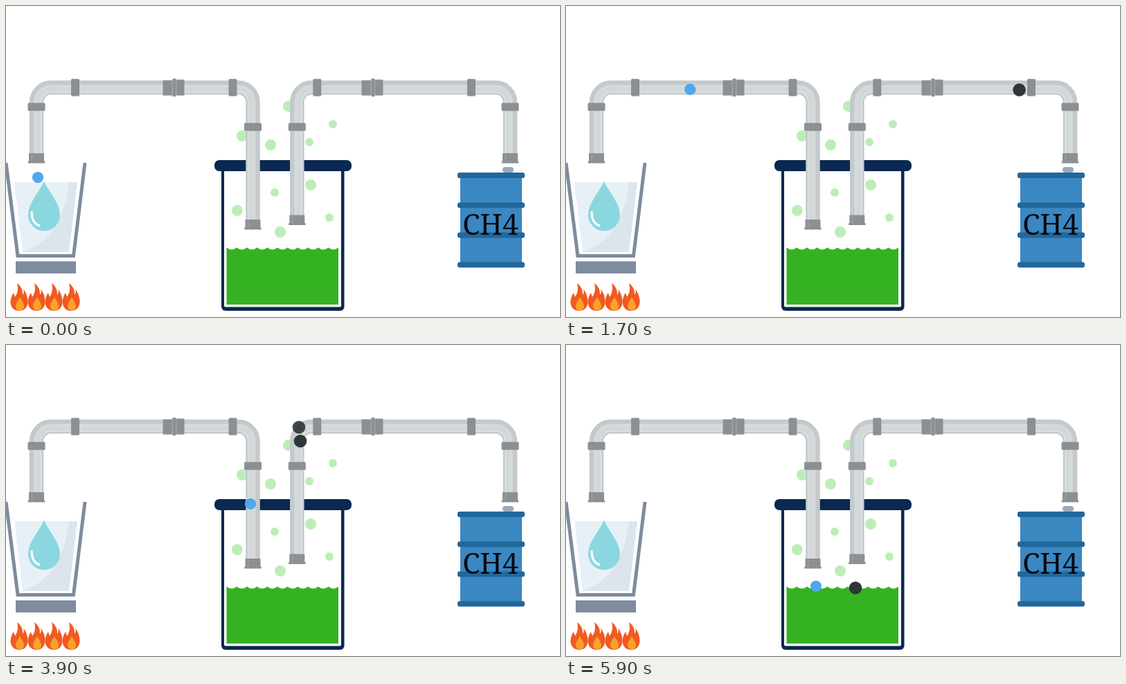
An HTML page with a canvas for the animation above (6 s loop, 800 by 450 pixels).

```html
<!DOCTYPE html>
<html lang="en">
<head>
<meta charset="utf-8">
<title>Gas pipeline</title>
<style>
html, body { margin: 0; width: 100%; height: 100%; overflow: hidden; background: #fff; }
canvas { display: block; }
</style>
</head>
<body>
<canvas id="stage" width="800" height="450"></canvas>
<script>
const ctx = document.getElementById('stage').getContext('2d');
const LOOP = 6000, STEP = 100;
const NAVY = '#0b2850', SLATE = '#7f8b9e', FITTING = '#8c9092', SEAM = '#a8acae';

function rect(x, y, w, h, color, r = 0) {
  ctx.fillStyle = color;
  ctx.beginPath();
  ctx.roundRect(x, y, w, h, r);
  ctx.fill();
}

const centeredRect = (x, y, w, h, color, r) => rect(x - w / 2, y - h / 2, w, h, color, r);

function circle(x, y, r, color) {
  ctx.fillStyle = color;
  ctx.beginPath();
  ctx.arc(x, y, r, 0, Math.PI * 2);
  ctx.fill();
}

function fillPath(color, d) {
  ctx.fillStyle = color;
  ctx.fill(new Path2D(d));
}

function strokePath(color, width, d) {
  ctx.strokeStyle = color;
  ctx.lineWidth = width;
  ctx.stroke(new Path2D(d));
}

// A pointed drop with a round base.
function drop(x, tip, bottom, r, color) {
  const mid = bottom - r;
  ctx.fillStyle = color;
  ctx.beginPath();
  ctx.moveTo(x, tip);
  ctx.bezierCurveTo(x + r * 0.2, tip + r * 0.6, x + r, mid - r * 0.8, x + r, mid);
  ctx.arc(x, mid, r, 0, Math.PI);
  ctx.bezierCurveTo(x - r, mid - r * 0.8, x - r * 0.2, tip + r * 0.6, x, tip);
  ctx.fill();
}

function drawFlame(x) {
  ctx.save();
  ctx.translate(x, 401);
  fillPath('#f15a22', 'M-3 0Q6 7 5 17Q8 13 6 8Q13 18 12.5 28Q11 40 0 40T-12.5 28Q-12 19 -8 14L-6 20Q0 12 -3 0Z');
  ctx.restore();
  drop(x + 1, 421, 440.5, 6, '#f9a32b');
}

function drawCup() {
  fillPath('#e7f0f7', 'M12 255H103L91 356H24Z');
  fillPath('#dce5ec', 'M103 255L91 356H24Q82 336 91 255Z');
  strokePath(SLATE, 5, 'M0 227L17 361.5H97.5L114 227');
  drop(55, 253, 325.5, 23, '#8ad7df');
  strokePath('#f4fcfd', 3.4, 'M37 297Q37 315 49 318');
  rect(14, 369.5, 87, 17.5, SLATE);
  for (let i = 0; i < 4; i++) drawFlame(19 + i * 25);
}

function drawLiquid(left, right, level, bottom) {
  const ripple = 14.7;
  ctx.fillStyle = '#35b222';
  ctx.beginPath();
  ctx.moveTo(left, bottom);
  ctx.lineTo(left, level);
  for (let x = left + ripple; x < right + ripple; x += ripple) {
    ctx.quadraticCurveTo(x - ripple / 2, level + 6, Math.min(x, right), level);
  }
  ctx.lineTo(right, bottom);
  ctx.fill();
}

function drawBubbles() {
  const large = [[408, 145], [341, 188], [382, 201], [440, 259], [334, 296], [396, 327]];
  const small = [[472, 171], [438, 197], [388, 270], [467, 306]];
  large.forEach(([x, y]) => circle(x, y, 8, '#bdedb7'));
  small.forEach(([x, y]) => circle(x, y, 6, '#bdedb7'));
}

function drawTank() {
  rect(311, 230, 177.5, 211, NAVY, 6);
  rect(315, 230, 169, 205.5, '#fff', 2);
  rect(301, 223, 198, 16, NAVY, 7);
  drawBubbles();
  drawLiquid(318.5, 480, 349.5, 432);
}

function drawBarrel() {
  rect(717, 233, 16, 8, '#9ca9b9', 4);
  rect(656, 243, 89, 134, '#3b87c2');
  for (let i = 0; i < 4; i++) rect(652, 241 + i * 43.2, 97, 8, '#22679b', 3);
  ctx.fillStyle = '#080a10';
  ctx.font = '41px "Noto Serif", serif';
  ctx.textAlign = 'center';
  ctx.fillText('CH4', 699.5, 331);
}

function drawCoupling(x, y) {
  rect(x - 16, y - 10.5, 14, 22, FITTING, 1);
  rect(x + 3, y - 11.5, 12, 23, FITTING, 1);
  rect(x - 2, y - 13, 5, 26, FITTING, 1);
  for (const side of [-3, 3]) rect(x + side, y - 11, 0.8, 22, SEAM);
}

function drawPipeEnd(x, bottom) {
  rect(x - 11, bottom - 14.5, 22, 12.5, FITTING, 1);
  rect(x - 12.3, bottom - 3, 24.6, 3, FITTING, 1);
  rect(x - 7, bottom - 13, 0.9, 11, SEAM);
}

// Both pipes share one layout, mirrored: the outer leg is short, the inner one enters the tank.
function drawPipe(outer, inner, innerEnd) {
  const top = 118, outerEnd = 227.5, dir = Math.sign(inner - outer);

  // A positive inset moves the stroke toward the inside of the bends.
  function strokeBend(inset, width, color) {
    const a = outer + dir * inset, b = inner - dir * inset, y = top + inset, r = 21 - inset;
    ctx.strokeStyle = color;
    ctx.lineWidth = width;
    ctx.beginPath();
    ctx.moveTo(a, outerEnd - 1);
    ctx.arcTo(a, y, b, y, r);
    ctx.arcTo(b, y, b, innerEnd, r);
    ctx.lineTo(b, innerEnd - 1);
    ctx.stroke();
  }

  strokeBend(0, 20.5, '#c4c9cb');
  strokeBend(2, 12, '#d2d7d9');
  strokeBend(-1.5, 1, '#dce0e2');
  strokeBend(6.5, 1.2, '#e0e4e5');
  centeredRect(outer, 146, 25, 11.5, FITTING, 1.5);
  centeredRect(inner, 175, 25, 11.5, FITTING, 1.5);
  centeredRect(outer + dir * 56, top, 12, 25, FITTING, 1.5);
  centeredRect(inner - dir * 29, top, 12, 25, FITTING, 1.5);
  drawCoupling(outer + dir * 198.5, top);
  drawPipeEnd(outer, outerEnd);
  drawPipeEnd(inner, innerEnd);
}

// A dot rests briefly when a leg begins, moves evenly, and fades once the next leg begins.
const REST = 60, FADE = 120;
const dots = [
  {
    color: '#52a6eb', r: 8.1,
    legs: [
      { from: [46, 248], to: [44, 122], begin: 0, arrive: 660 },
      { from: [44, 122], to: [349, 119], begin: 660, arrive: 2930 },
      { from: [346, 128], to: [361, 349], begin: 3090, arrive: 4775 }
    ]
  },
  {
    color: '#2f3539', r: 9.3,
    legs: [
      { from: [725, 237], to: [724, 122], begin: 450, arrive: 1150 },
      { from: [718, 122], to: [423, 119], begin: 1165, arrive: 3435 },
      { from: [425, 139], to: [418, 351.5], begin: 3890, arrive: 5600 }
    ]
  }
];

const clamp = v => Math.min(1, Math.max(0, v));

function drawDot({ color, r, legs }, t) {
  legs.forEach(({ from, to, begin, arrive }, i) => {
    const next = legs[i + 1]?.begin ?? LOOP;
    if (t < begin) return;
    const start = begin + REST;
    const k = clamp((t - start) / (arrive - start));
    const [x, y] = from.map((v, axis) => v + (to[axis] - v) * k);
    ctx.globalAlpha = 1 - clamp((t - next) / FADE);
    circle(x, y, r, color);
    ctx.globalAlpha = 1;
  });
}

function render(now) {
  const t = Math.floor((now % LOOP) / STEP) * STEP;
  ctx.fillStyle = '#fff';
  ctx.fillRect(0, 0, 800, 450);
  drawCup();
  drawTank();
  drawBarrel();
  drawPipe(44, 356.5, 323.5);
  drawPipe(728, 420.3, 317);
  dots.forEach(dot => drawDot(dot, t));
}

const origin = performance.now();
function tick() {
  render(performance.now() - origin);
  requestAnimationFrame(tick);
}
tick();
</script>
</body>
</html>
```
